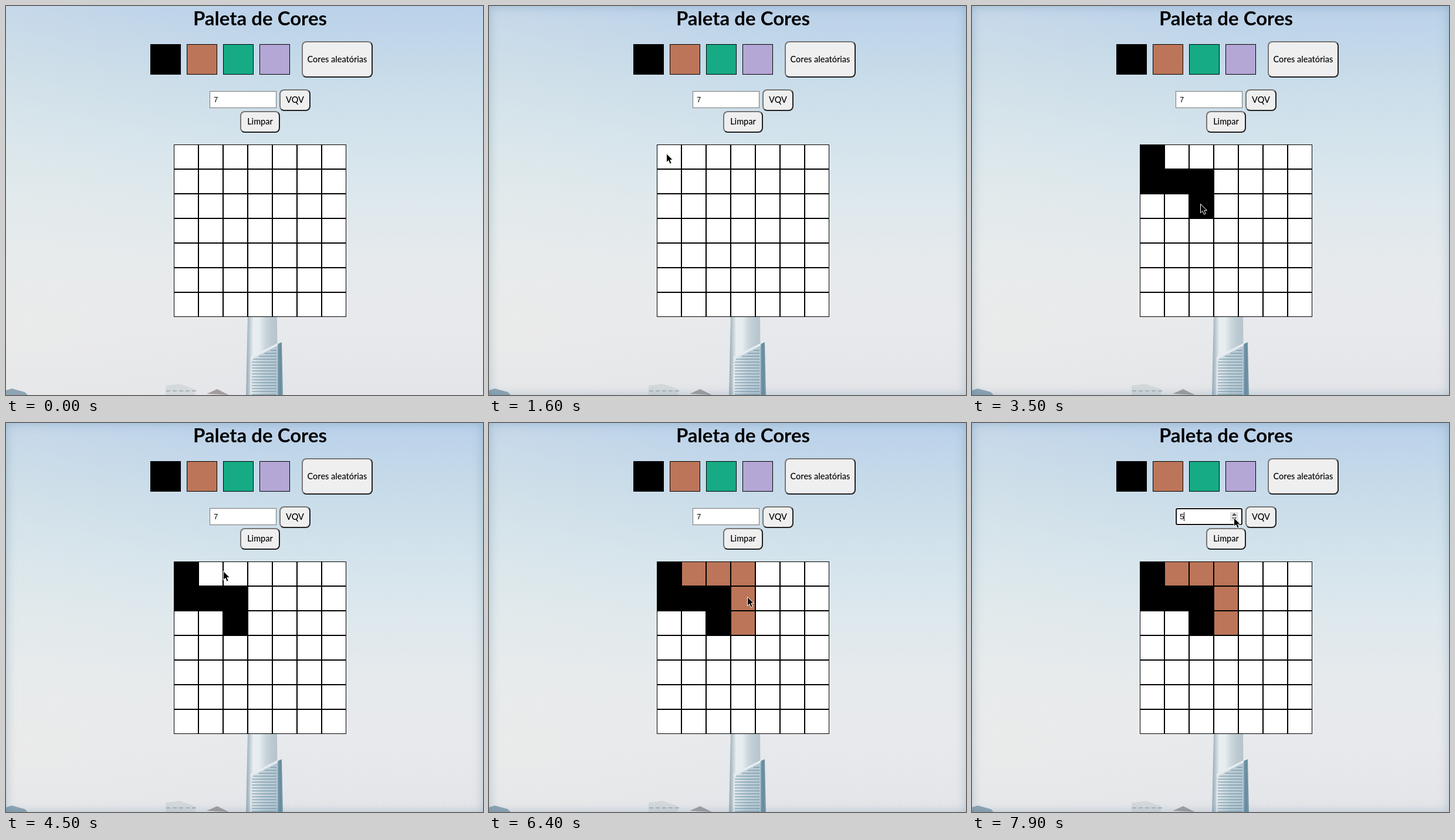
An HTML page with a canvas that plays this animation: 813 px wide and 663 px high, repeating every 8000 ms.

```html
<!DOCTYPE html>
<html lang="pt">
<head>
<meta charset="utf-8">
<title>Paleta de Cores</title>
<style>
html, body { margin: 0; width: 100%; height: 100%; overflow: hidden; background: #e4e8ec; }
body * { position: absolute; box-sizing: border-box; }
canvas { left: 0; top: 0; }
h1 { left: 232px; top: -1px; width: 402px; margin: 0; text-align: center; white-space: nowrap;
  font: bold 33px/43px Lato, sans-serif; color: #000; }
.btn { display: flex; align-items: center; justify-content: center; white-space: nowrap;
  padding-bottom: 2px; font: 500 14.5px Lato, sans-serif; color: #000; background: #efefef;
  border: 2px solid; border-color: #767676 #212121 #212121 #767676; border-radius: 8px; }
#field { left: 347px; top: 145px; width: 114px; height: 29px; background: #fff; border: 1px solid #767676; }
#field.focus { border: 2px solid #101010; border-radius: 3px; box-shadow: 0 0 0 1px #fff; }
#value { left: 354px; top: 152px; font: 13.33px/15px "Liberation Sans", Arial, sans-serif; }
#caret { left: 361px; top: 152px; width: 1px; height: 15px; background: #000; }
#glow { left: 0; top: 0; width: 813px; height: 663px; box-shadow: inset 0 0 17px rgba(80, 125, 155, .36); }
svg { overflow: visible; }
</style>
</head>
<body>
<canvas id="stage" width="813" height="663"></canvas>
<div id="glow"></div>
<h1>Paleta de Cores</h1>
<div class="btn" style="left:504px;top:60px;width:121px;height:62px">Cores aleatórias</div>
<div class="btn" style="left:466px;top:142px;width:53px;height:37px">VQV</div>
<div class="btn" style="left:399px;top:179px;width:68px;height:37px">Limpar</div>
<div id="field"></div>
<div id="value">7</div>
<div id="caret"></div>
<svg id="spin" style="left:440px;top:152px" width="14" height="15">
  <path d="M0 0H14V15H0Z" fill="#e3e3e3"/>
  <path d="M3 6L7 1.5L11 6ZM3 9L7 13.5L11 9Z" fill="#505050"/>
</svg>
<svg id="cursor" style="left:-1px;top:-1px" width="13" height="20">
  <path d="M.5 .5V15.6L4 12.4L6.4 18.2L9.2 17L6.8 11.3H11.4Z" fill="#000" stroke="#fff"/>
</svg>
<script>
const LOOP = 8000, STEP = 100, SIZE = 42, SIDE = 7, LEFT = 286, TOP = 236;
const $ = id => document.getElementById(id);
const ctx = $('stage').getContext('2d');
const SWATCHES = ['#000', '#bc7558', '#16ab85', '#b4a7d6'];

// Pointer stops: a click picks the swatch or paints the cell under it
const click = (t, x, y) => ({ t, x, y, press: true });
const hover = (t, x, y) => ({ t, x, y });
const STOPS = [
  hover(600, 448, 42), hover(900, 311, 104), click(1100, 271, 96),
  hover(1600, 303, 252), click(1900, 304, 256), click(2400, 323, 309),
  click(2800, 345, 292), click(3200, 384, 308), click(3500, 390, 338),
  click(4100, 345, 101), hover(4500, 371, 253), click(5000, 350, 257),
  click(5200, 385, 260), click(5600, 427, 267), click(5900, 433, 285),
  click(6100, 430, 328), hover(6400, 441, 297), hover(6700, 440, 157),
  hover(7000, 449, 165), hover(7300, 494, 184), click(7500, 447, 162)
];

function poly(target, fill, ...pts) {
  target.fillStyle = fill;
  target.beginPath();
  for (let i = 0; i < pts.length; i += 2) target.lineTo(pts[i], pts[i + 1]);
  target.fill();
}

function ramp(target, x0, y0, x1, y1, colours) {
  const g = target.createLinearGradient(x0, y0, x1, y1);
  colours.forEach((c, i) => g.addColorStop(i / (colours.length - 1), c));
  return g;
}

function makeBackdrop() {
  const layer = document.createElement('canvas');
  layer.width = 813;
  layer.height = 663;
  const c = layer.getContext('2d');
  c.fillStyle = ramp(c, 0, 0, 0, 663,
    ['#bad1ea', '#c7dbe9', '#d3e3ec', '#dee8ed', '#e6eaed', '#e8e9ec', '#e4e5e9']);
  c.fillRect(0, 0, 813, 663);
  c.fillStyle = ramp(c, 0, 60, 420, 0, ['rgba(240,240,232,.22)', 'rgba(240,240,232,0)']);
  c.fillRect(0, 0, 813, 663);

  // skyline
  poly(c, '#8fa5b3', 0, 655, 10, 652, 32, 658, 37, 663, 0, 663);
  poly(c, '#d5d9db', 272, 647, 296, 644, 322, 653, 322, 663, 272, 663);
  c.fillStyle = '#a9b3ba';
  for (let x = 273; x < 318; x += 11) c.fillRect(x, 655, 7, 2);
  poly(c, '#a39d9f', 342, 661, 360, 653, 380, 663);

  // tower
  poly(c, ramp(c, 411, 0, 463, 0, ['#9fb2bd', '#e9eef0', '#e6ecef', '#cbd6dc', '#bdcad2', '#b4c3cc']),
    412, 528, 462, 528, 463, 663, 409, 663);
  poly(c, ramp(c, 416, 0, 464, 0, ['#e3e9ec', '#c0cfd7', '#b4c6d0']),
    417, 598, 463, 575, 464, 663, 416, 663);
  c.fillStyle = 'rgba(80,125,150,.42)';
  for (let y = 586; y < 663; y += 5) {
    const x = Math.max(419, 419 + (602 - y) * 2);
    c.fillRect(x, y, 461 - x, 2);
  }
  poly(c, '#e6edf0', 417, 598, 470, 571, 470, 575, 417, 602);
  poly(c, ramp(c, 462, 0, 472, 0, ['#8aa9b8', '#62899d', '#819fad']),
    463, 576, 470, 573, 472, 663, 463, 663);
  return layer;
}

function box(x, y, w, fill) {
  ctx.fillStyle = '#000';
  ctx.fillRect(x, y, w, w);
  ctx.fillStyle = fill;
  ctx.fillRect(x + 1, y + 1, w - 2, w - 2);
}

function pointer(t) {
  const i = STOPS.findIndex(s => s.t > t);
  if (i < 0) return STOPS[STOPS.length - 1];
  const a = STOPS[i - 1], b = STOPS[i];
  const k = (t - a.t) / (b.t - a.t), e = k * k * (3 - 2 * k);
  return { x: Math.round(a.x + (b.x - a.x) * e), y: Math.round(a.y + (b.y - a.y) * e) };
}

const inField = ({ x, y }) => x >= 347 && x < 461 && y >= 145 && y < 174;

function paintedCells(t) {
  const cells = Array(SIDE * SIDE).fill('#fff');
  let ink = SWATCHES[0];
  for (const s of STOPS) {
    if (!s.press || s.t > t) continue;
    const col = Math.floor((s.x - LEFT) / SIZE), row = Math.floor((s.y - TOP) / SIZE);
    if (s.y < 118) ink = SWATCHES[Math.floor((s.x - 246) / 62)];
    else if (row >= 0) cells[row * SIDE + col] = ink;
  }
  return cells;
}

const backdrop = makeBackdrop();
const show = (id, on) => { $(id).style.visibility = on ? 'visible' : 'hidden'; };

function draw(t) {
  ctx.drawImage(backdrop, 0, 0);
  SWATCHES.forEach((c, i) => box(246 + 62 * i, 65, 52, c));
  paintedCells(t).forEach((c, i) =>
    box(LEFT + i % SIDE * SIZE, TOP + Math.floor(i / SIDE) * SIZE, SIZE, c));

  const visible = t >= STOPS[0].t;
  const tip = visible ? pointer(t) : { x: 0, y: 0 };
  const focus = STOPS.some(s => s.press && s.t <= t && inField(s));
  $('cursor').style.transform = `translate(${tip.x}px, ${tip.y}px)`;
  show('cursor', visible);
  show('glow', t >= 100);
  show('spin', inField(tip));
  show('caret', focus);
  $('field').className = focus ? 'focus' : '';
  $('value').textContent = t >= 7800 ? 5 : t >= 7600 ? 6 : 7;
}

let last = -1;
function tick() {
  const t = Math.floor(performance.now() % LOOP / STEP) * STEP;
  if (t !== last) draw(last = t);
  requestAnimationFrame(tick);
}
tick();
</script>
</body>
</html>
```
